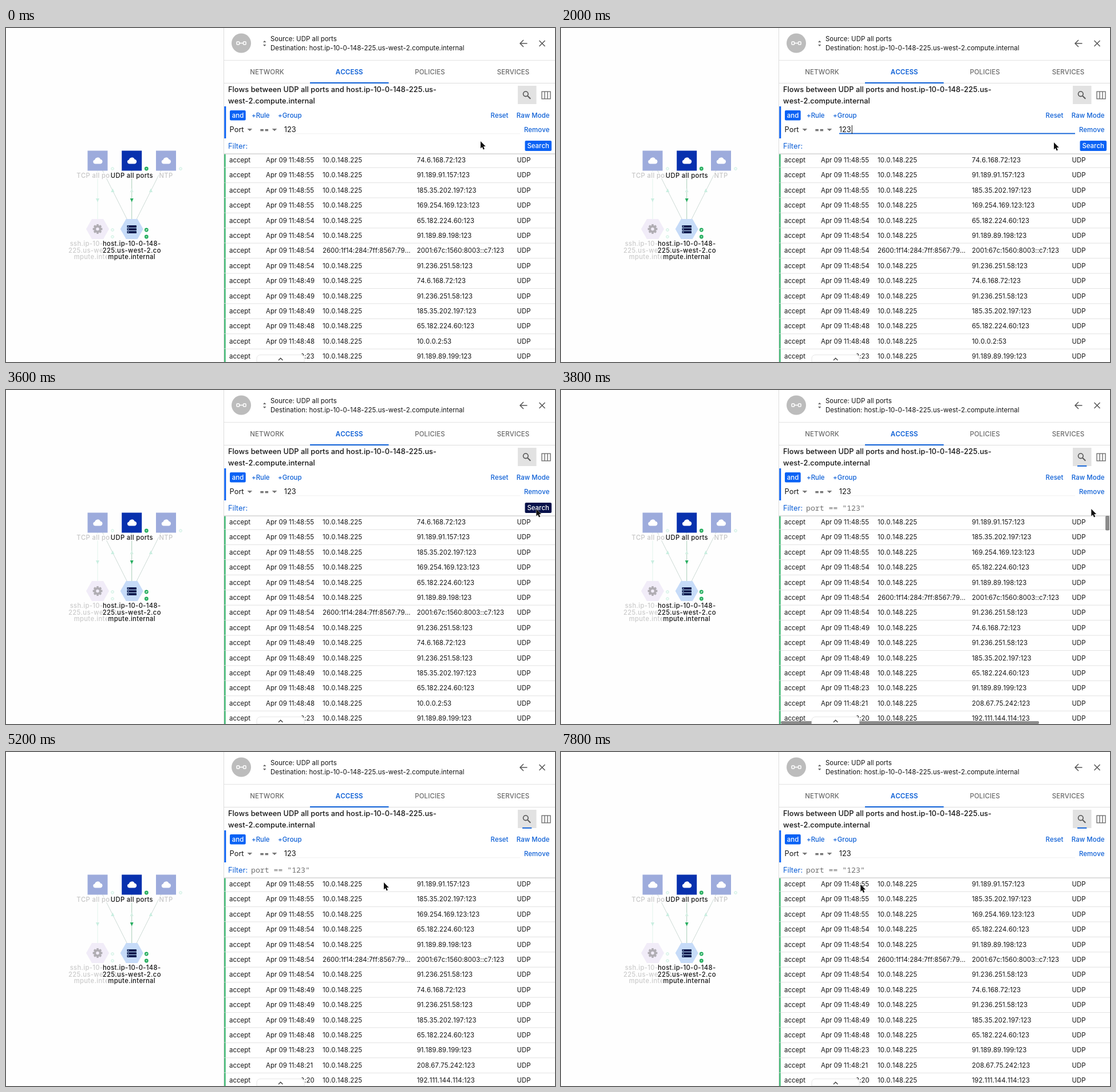
An HTML page for the animation above (8 s loop, 959 px wide and 584 px high).

```html
<!DOCTYPE html>
<html lang="en">
<head>
<meta charset="utf-8">
<title>Access flows</title>
<style>
  html, body { margin: 0; width: 100%; height: 100%; overflow: hidden; background: #fefefe; }
  svg { display: block; width: 959px; height: 584px; }
  text { font-family: Inter, "Open Sans", sans-serif; font-size: 11.4px; letter-spacing: .04px; fill: #141414;
         font-kerning: none; font-feature-settings: "calt" 0; white-space: pre; }
  .mid { text-anchor: middle; }
  .med { font-weight: 500; }
  .big { font-size: 12.8px; }
  .blue { fill: #0c5fd6; }
  .tab { font-size: 11.5px; font-weight: 500; letter-spacing: .1px; fill: #6a6a6a; text-anchor: middle; }
  .tab.on { font-weight: 600; fill: #0c5fd6; }
  .label { font-size: 11.2px; font-weight: 500; letter-spacing: .37px; text-anchor: middle;
           stroke: #fefefe; stroke-width: 3px; stroke-linejoin: round; paint-order: stroke; }
  .mono { font-family: "Noto Sans Mono", "DejaVu Sans Mono", monospace; font-size: 13.2px; letter-spacing: 0; fill: #707070; }
</style>
</head>
<body>
<svg id="stage" viewBox="0 0 959 584" xmlns="http://www.w3.org/2000/svg"></svg>
<script>
const LOOP = 8000, STEP = 200;
const BLUE = '#0a62f5', GREEN = '#27ae60', PALE = '#c9eee0';
const ROW = 26.42;

const text = (x, y, s, cls = '', extra = '') => `<text x="${x}" y="${y}" class="${cls}" ${extra}>${s}</text>`;
const rect = (x, y, w, h, fill, extra = '') => `<rect x="${x}" y="${y}" width="${w}" height="${h}" fill="${fill}" ${extra}/>`;
const path = (d, fill, stroke = 'none', width = 1, extra = '') =>
  `<path d="${d}" fill="${fill}" stroke="${stroke}" stroke-width="${width}" ${extra}/>`;
const circle = (x, y, r, fill, stroke = 'none') => `<circle cx="${x}" cy="${y}" r="${r}" fill="${fill}" stroke="${stroke}"/>`;
const group = (id, body, extra = '') => `<g id="${id}" ${extra}>${body}</g>`;

// Network graph
const cloud = (x, fill) => rect(x - 17.5, 214.5, 35, 35, fill) +
  path(`M${x - 4.5} 237.5a3.6 3.6 0 0 1-.4-7.1a5.2 5.2 0 0 1 9.8-1a4.1 4.1 0 0 1 .2 8.1z`, '#fff');
const label = (x, y, lines, fill) =>
  lines.map((s, i) => text(x, y + i * 11.6, s, 'label', `style="fill:${fill}"`)).join('');
const hexagon = (x, fill) => path(`M${x - 20} 351.5l10-17.5h20l10 17.5l-10 17.5h-20z`, fill);
const arrow = (x, y, dir, fill) => path(`M${x - 3} ${y - 3 * dir}h6l-3 ${6.5 * dir}z`, fill);
const ring = (x, y) => circle(x, y, 2.3, '#f4fdf9', PALE);
const dot = (x, y) => circle(x, y, 3.4, GREEN) + circle(x, y, 1, '#c4f0d5');

function gear(x, y) {
  let teeth = '';
  for (let a = 0; a < 360; a += 45)
    teeth += rect(x - 1.9, y - 8.4, 3.8, 4, '#b0adb3', `rx=".8" transform="rotate(${a} ${x} ${y})"`);
  return teeth + `<circle cx="${x}" cy="${y}" r="4.6" fill="none" stroke="#b0adb3" stroke-width="3.6"/>`;
}

function graph() {
  const hostTail = ['225.us-west-2.co', 'mpute.internal'];
  const bars = [345, 350, 355].map(y =>
    rect(211.5, y, 16.5, 4, '#0a1c50', 'rx=".4"') + rect(213, y + 1.3, 1.5, 1.4, '#c8dcf8')).join('');
  return path('M160 232V351', 'none', '#e2f3ec') +
    path('M160 232L219.7 351M279.5 232L219.7 351', 'none', '#cddad5') +
    path('M219.7 232V351', 'none', '#a9cdb9') +
    arrow(160, 301, 1, PALE) + arrow(186.3, 284, -1, PALE) + arrow(253, 284, -1, PALE) +
    arrow(219.7, 284, -1, '#d4efe3') + arrow(219.7, 301, 1, GREEN) +
    hexagon(160, '#f1ecf8') + gear(160, 351.5) +
    hexagon(219.7, '#c6dbf8') + bars +
    cloud(160, '#9dabdc') + cloud(279.5, '#9dabdc') + cloud(219.7, '#0831ae') +
    label(160, 262, ['TCP all ports'], '#c6c6c6') + label(279.5, 262, ['NTP'], '#c6c6c6') +
    label(219.9, 262, ['UDP all ports'], '#141414') +
    label(160, 381, ['ssh.ip-10-0-148-', ...hostTail], '#cbcbcb') +
    label(219.7, 381, ['host.ip-10-0-148-', ...hostTail], '#141414') +
    ring(186, 246) + ring(305, 246) + ring(186, 353) + ring(186, 365) +
    dot(245.3, 246) + dot(245.3, 353) + dot(245.3, 365) +
    path('M243.8 353l1.1 1.1l2-2.2', 'none', '#fff', .9);
}

// Side panel
function header() {
  const tabs = [['NETWORK', 456], ['ACCESS', 599.7], ['POLICIES', 740.5], ['SERVICES', 886]];
  return rect(381, 0, 578, 584, '#fff') + rect(380, 0, 1, 584, '#dcdcdc') +
    circle(411, 26.5, 17, '#bcbcbc') +
    path('M407 26.5h8', 'none', '#fff', 1.6) +
    `<g fill="none" stroke="#fff" stroke-width="1.5"><rect x="403" y="24" width="4.6" height="5" rx="1"/><rect x="414.5" y="24" width="4.6" height="5" rx="1"/></g>` +
    path('M449 25l2.7-3l2.7 3zM449 29l2.7 3l2.7-3z', '#666') +
    text(462, 22.8, 'Source: UDP all ports') +
    text(462, 39, 'Destination: host.ip-10-0-148-225.us-west-2.compute.internal') +
    path('M910.5 27H898.5M904 21l-6 6l6 6M931.5 22l10 10M941.5 22l-10 10', 'none', '#555', 1.5) +
    rect(381, 56, 578, 1, '#e4e4e4') + rect(381, 96, 578, 1, '#dedede') +
    tabs.map(([s, x], i) => text(x, 81, s, i === 1 ? 'tab on' : 'tab')).join('') +
    rect(531, 95, 137.5, 2, '#0c5fd6') +
    text(388, 112.3, 'Flows between UDP all ports and host.ip-10-0-148-225.us-', 'big med') +
    text(388, 132.3, 'west-2.compute.internal', 'big med') +
    rect(894, 101, 32.5, 32, '#e2e2e2') +
    `<circle cx="907.8" cy="115.3" r="4.3" fill="none" stroke="#555" stroke-width="1.6"/>` +
    path('M911 118.6l5.2 5.2', 'none', '#555', 2) +
    path('M936 111.2h15v12.6h-15zM941 111v13M946 111v13', 'none', '#666', 1.3);
}

function query() {
  return rect(381.3, 137, 3, 56, BLUE) +
    rect(391, 144, 27.7, 17.5, BLUE, 'rx="2"') +
    text(405, 157, 'and', 'mid med', 'style="fill:#fff"') +
    text(429, 157, '+Rule', 'blue med') + text(475, 157, '+Group', 'blue med') +
    text(877.5, 157, 'Reset', 'blue med', 'text-anchor="end"') +
    text(949.5, 157, 'Raw Mode', 'blue med', 'text-anchor="end"') +
    text(949.5, 181.5, 'Remove', 'blue med', 'text-anchor="end"') +
    text(390.5, 182.3, 'Port', 'big') + text(443, 181.8, '==', '', 'style="font-size:12.4px"') +
    path('M421.5 176h8.6l-4.3 4.3zM464.7 176h8.6l-4.3 4.3z', '#777') +
    text(485.7, 182.3, '123', 'big') +
    rect(486, 184.3, 412, 1, '#f0f0f0') +
    text(388, 211, 'Filter:', 'big blue');
}

// Flow table
const before = [
  ['55', '74.6.168.72:123'], ['55', '91.189.91.157:123'], ['55', '185.35.202.197:123'],
  ['55', '169.254.169.123:123'], ['54', '65.182.224.60:123'], ['54', '91.189.89.198:123'],
  ['54', '2001:67c:1560:8003::c7:123', '2600:1f14:284:7ff:8567:79...'], ['54', '91.236.251.58:123'],
  ['49', '74.6.168.72:123'], ['49', '91.236.251.58:123'], ['49', '185.35.202.197:123'],
  ['48', '65.182.224.60:123'], ['48', '10.0.0.2:53'], ['23', '91.189.89.199:123']
];
const after = [...before.filter((r, i) => i !== 0 && i !== 12),
  ['21', '208.67.75.242:123'], ['20', '192.111.144.114:123']];

const rowsOf = list => list.map(([sec, dest, src = '10.0.148.225'], i) => {
  const y = +(234.8 + i * ROW).toFixed(1);
  return text(390, y, 'accept') + text(454, y, 'Apr 09 11:48:' + sec) +
    text(553, y, src) + text(717.7, y, dest) + text(892.5, y, 'UDP');
}).join('');

function grid() {
  let out = rect(381, 219.5, 578, 1.2, '#c9c9c9');
  for (let i = 0; i < 14; i++) {
    const y = 220.7 + i * ROW - (i ? 3 : 0);
    const end = 243.6 + i * ROW;
    out += rect(381.3, y, 2.2, end - y, GREEN) + rect(381.3, end, 577.7, 1, '#e2e2e2');
  }
  return out;
}

const drawer = rect(441, 567, 75.5, 17, '#fff') +
  path('M438 584V577Q439 571.5 445 571.5H514Q520 571.5 521 577V584z', '#fff', '#e6e6e6') +
  path('M476 581l3.7-3.7l3.7 3.7', 'none', '#444', 1.4);

const el = {};
document.getElementById('stage').innerHTML =
  rect(0, 0, 959, 584, '#fefefe') + graph() + header() + query() + grid() +
  group('before', rowsOf(before)) +
  group('after', rowsOf(after) + text(428, 211, 'port == "123"', 'mono') + rect(902, 131.9, 16.3, 1.9, '#0c5fd6')) +
  group('bars', rect(951, 220, 7, 25.5, '#000', 'rx="2"') + rect(384, 579, 451, 5, '#000', 'rx="2"')) +
  drawer +
  `<rect id="ink" y="183.6" height="1.8" fill="#0c5fd6"/>` +
  `<rect id="caret" x="507.8" y="170" width="1" height="15" fill="#111"/>` +
  group('search', `<rect id="button" x="906.5" y="197" width="46.5" height="18" rx="2"/>` +
    text(929.7, 210.2, 'Search', 'mid med', 'style="fill:#fff"')) +
  group('pointer', path('M0 0V12.4L2.8 9.9L4.7 14.4L6.9 13.4L5 9.1H8.8z', '#111', '#fff', 1, 'paint-order="stroke"'));
for (const id of ['before', 'after', 'bars', 'ink', 'caret', 'search', 'button', 'pointer'])
  el[id] = document.getElementById(id);

// Pointer stops: time, x, y
const stops = [
  [0, 829, 198], [1800, 829, 198], [2000, 861, 200], [2200, 896, 203.5], [2400, 919, 206.5],
  [2600, 926.3, 208], [4800, 926.3, 208], [5000, 850, 213], [5200, 660, 228], [5400, 560, 236],
  [5600, 560, 236], [6400, 492.3, 238.5], [6800, 497, 238.5], [7800, 523.3, 231.5], [8000, 523.3, 231.5]
];

function pointerAt(t) {
  const i = stops.findIndex(s => s[0] > t);
  const [t0, x0, y0] = stops[i - 1], [t1, x1, y1] = stops[i];
  const k = (t - t0) / (t1 - t0);
  return [x0 + (x1 - x0) * k, y0 + (y1 - y0) * k];
}

const within = (t, a, b) => t >= a && t < b;
const show = (node, on) => node.setAttribute('visibility', on ? 'visible' : 'hidden');

function draw(t) {
  const loaded = t >= 3800;
  const focused = within(t, 800, 3200);
  const reach = t < 1000 ? 75 : 206;
  const [x, y] = pointerAt(t);

  show(el.before, !loaded);
  show(el.after, loaded);
  show(el.search, !loaded);
  show(el.ink, focused);
  show(el.caret, focused && !within(t, 1400, 2000) && !within(t, 2400, 3000));
  el.ink.setAttribute('x', 692 - reach);
  el.ink.setAttribute('width', reach * 2);
  el.button.setAttribute('fill', t >= 2400 ? '#06114a' : BLUE);
  el.bars.setAttribute('opacity', within(t, 3800, 4600) ? Math.min(.45, .2 + (4400 - t) / 900) : 0);
  el.pointer.setAttribute('transform', `translate(${x} ${y})`);
}

const start = performance.now();
function tick() {
  const t = (performance.now() - start) % LOOP;
  draw(Math.floor(t / STEP) * STEP);
  requestAnimationFrame(tick);
}
tick();
</script>
</body>
</html>
```
